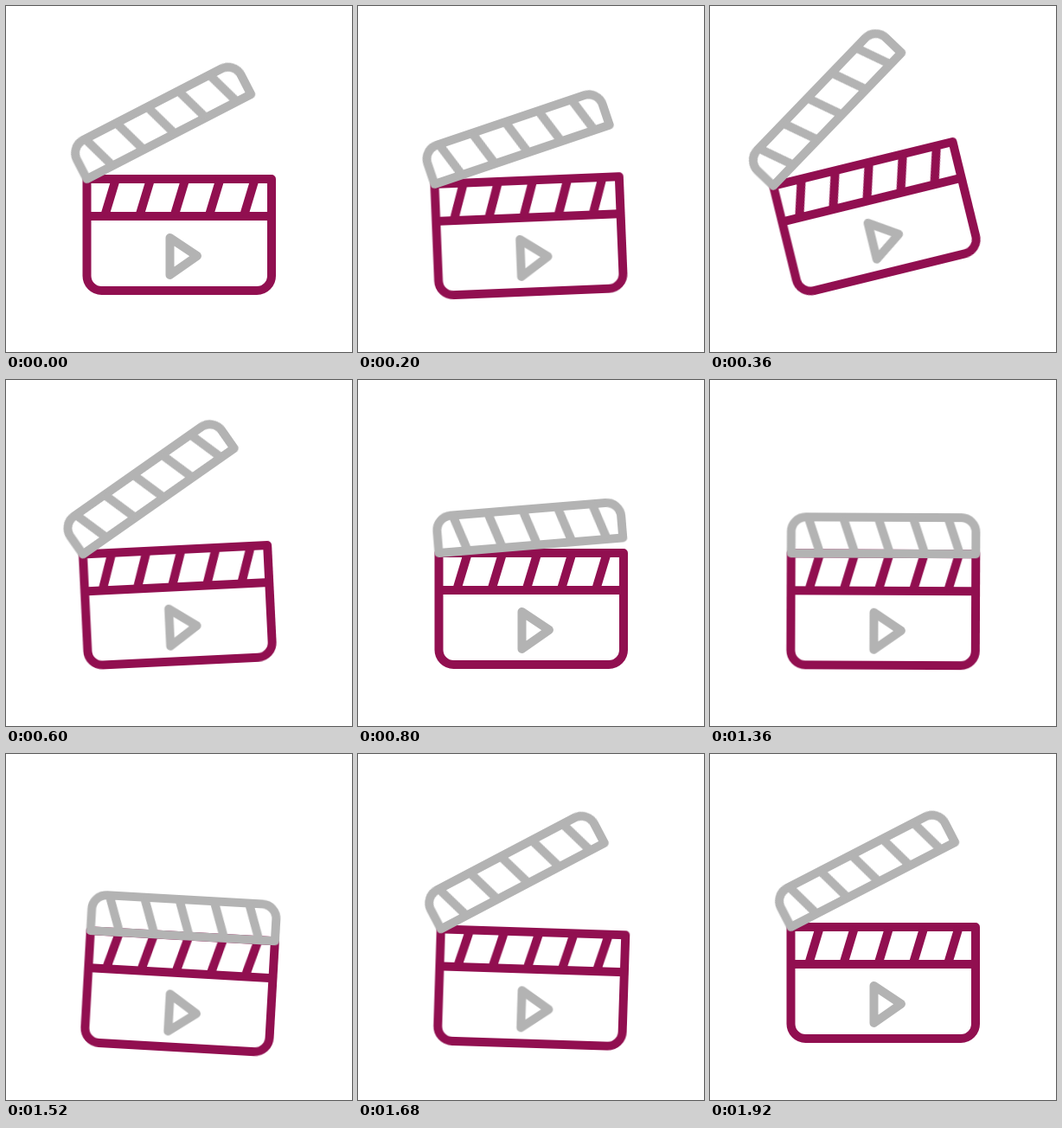
Write an HTML page that moves like this. It is 400 px wide and 400 px high and loops after 2 s.

```html
<!DOCTYPE html>
<html lang="en">
<head>
<meta charset="utf-8">
<title>Clapperboard</title>
<style>
  html, body { margin: 0; width: 100%; height: 100%; overflow: hidden; background: #fff; }
  svg { display: block; width: 100vw; height: 100vh; }
  path { fill: none; stroke-width: 10; stroke-linejoin: round; }
  .wine { stroke: #910f50; }
  .grey { stroke: #b3b3b3; }

  #board, #arm {
    --soft: cubic-bezier(.33, 0, .67, 1);
    animation: 2s infinite;
    animation-timing-function: var(--soft);
  }
  #board { transform-origin: 200px 200px; animation-name: board; }
  #arm { transform-origin: 93.5px 200px; animation-name: arm; }

  /* dip, wind up, snap back, rest, dip again */
  @keyframes board {
    0% { transform: translate(0, 0) rotate(0deg); }
    5% { transform: translate(4.7px, 11.8px) rotate(3.75deg); animation-timing-function: cubic-bezier(.27, 0, .28, 1); }
    26% { transform: translate(-27.3px, -21.6px) rotate(-16.2deg); }
    31.5%, 66% { transform: translate(0, 0) rotate(0deg); }
    79% { transform: translate(4.7px, 11.8px) rotate(3.75deg); }
    89%, 100% { transform: translate(0, 0) rotate(0deg); }
  }

  /* open wide, slam with small bounces, reopen past the resting angle */
  @keyframes arm {
    0% { transform: rotate(-27.3deg); }
    5% { transform: rotate(-6deg); animation-timing-function: cubic-bezier(.16, 0, .41, 1); }
    26% { transform: rotate(-37deg); }
    27.5% { transform: rotate(-37deg); animation-timing-function: cubic-bezier(.42, 0, 1, 1); }
    36% { transform: rotate(0deg); animation-timing-function: ease-out; }
    41% { transform: rotate(-5deg); animation-timing-function: ease-in; }
    46% { transform: rotate(0deg); animation-timing-function: ease-out; }
    49% { transform: rotate(-1deg); animation-timing-function: ease-in; }
    52%, 76% { transform: rotate(0deg); }
    87% { transform: rotate(-36deg); }
    94%, 100% { transform: rotate(-27.3deg); }
  }
</style>
</head>
<body>
<svg viewBox="0 0 400 400">
  <g id="board">
    <path class="wine" d="M93.5 200H307V312a17 17 0 0 1-17 17H110.5a17 17 0 0 1-17-17ZM93.5 243H307"/>
    <path class="wine" d="M127 200l-13 43m53.2-43l-13 43m53.2-43l-13 43m53.2-43l-13 43m53.2-43l-13 43"/>
    <path class="grey" d="M189.5 268V311L221 289Z"/>
    <g id="arm">
      <path class="grey" d="M93.5 200V175a17 17 0 0 1 17-17H290a17 17 0 0 1 17 17V200Z"/>
      <path class="grey" d="M113 158l14 42m26.4-42l14 42m26.4-42l14 42m26.4-42l14 42m26.4-42l14 42"/>
    </g>
  </g>
</svg>
</body>
</html>
```
